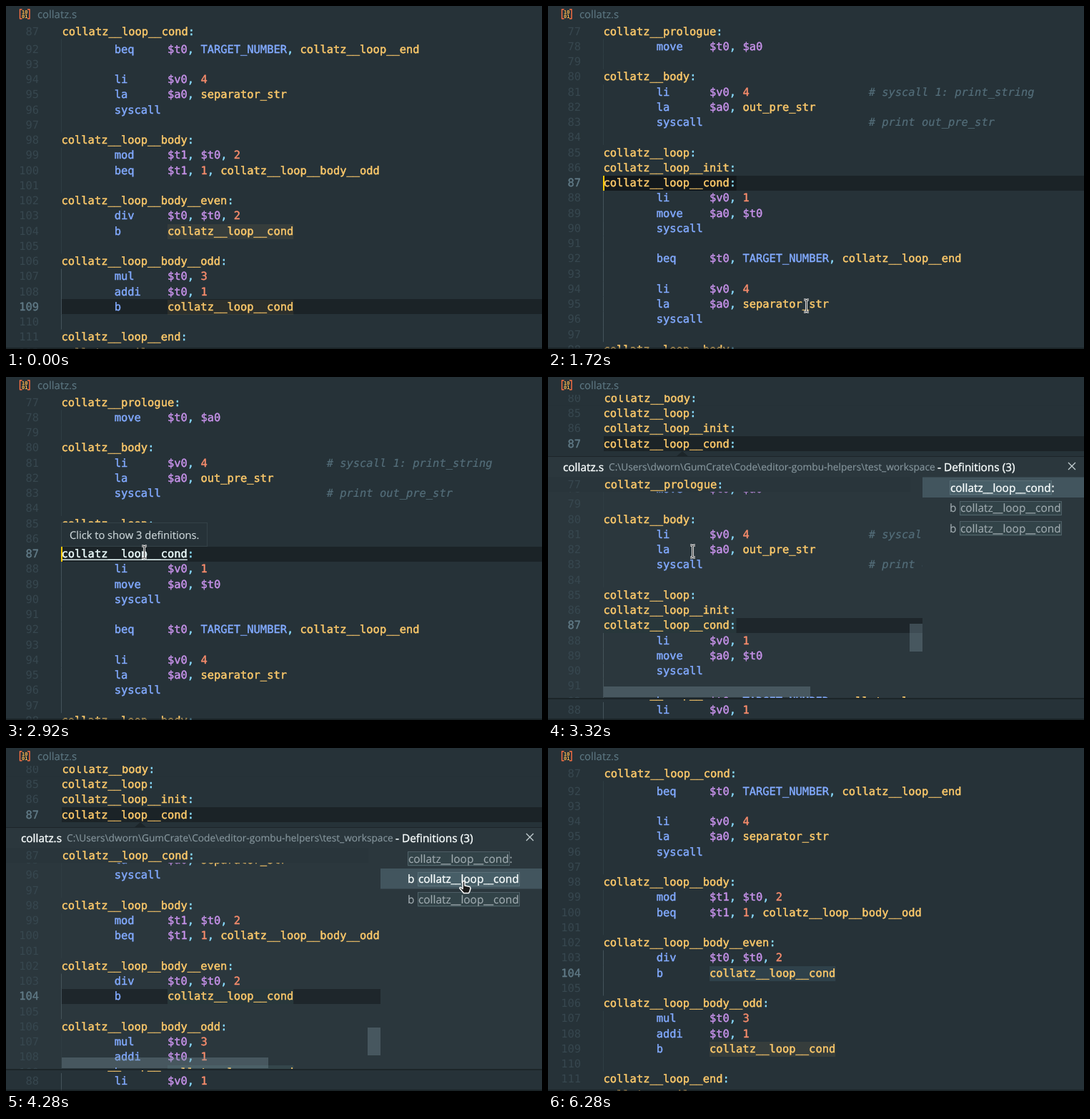
An HTML page with a canvas that plays this animation: 750 by 481 pixels, repeating every 6.36 s.

```html
<!DOCTYPE html>
<html lang="en">
<head>
<meta charset="utf-8">
<title>Peek definitions</title>
<style>
html, body { margin: 0; width: 100%; height: 100%; overflow: hidden; background: #263238; }
canvas { display: block; }
</style>
</head>
<body>
<canvas id="stage" width="750" height="481"></canvas>
<script>
const ctx = document.getElementById('stage').getContext('2d');
const LOOP = 6360, ROW = 21.25, CH = 9.28, LEFT = 77.5, FIRST = 77;
const MONO = '15.42px "DejaVu Sans Mono", monospace';
const UI = '"Open Sans", "Noto Sans", sans-serif';
const BG = '#263238', PEEK = '#2b373d', EDGE = '#1c2529', WHITE = '#f8fdfd';
const OLIVE = 'rgba(255,203,107,.075)', SELECT = '#2f414a', TEAL = 'rgba(128,203,196,.1)';

// Tabs are eight columns wide.
const lines = `collatz__prologue:
\tmove\t$t0, $a0

collatz__body:
\tli\t$v0, 4\t\t\t# syscall 1: print_string
\tla\t$a0, out_pre_str
\tsyscall\t\t\t\t# print out_pre_str

collatz__loop:
collatz__loop__init:
collatz__loop__cond:
\tli\t$v0, 1
\tmove\t$a0, $t0
\tsyscall

\tbeq\t$t0, TARGET_NUMBER, collatz__loop__end

\tli\t$v0, 4
\tla\t$a0, separator_str
\tsyscall

collatz__loop__body:
\tmod\t$t1, $t0, 2
\tbeq\t$t1, 1, collatz__loop__body__odd

collatz__loop__body__even:
\tdiv\t$t0, $t0, 2
\tb\tcollatz__loop__cond

collatz__loop__body__odd:
\tmul\t$t0, 3
\taddi\t$t0, 1
\tb\tcollatz__loop__cond

collatz__loop__end:
collatz__epilogue:`.split('\n').map(expandTabs);

function expandTabs(s) {
  let out = '';
  for (const c of s) out += c === '\t' ? ' '.repeat(8 - out.length % 8) : c;
  return out;
}

function tokenColor(word, col) {
  if (word[0] === '#') return '#546e7a';
  if (word[0] === '$') return '#c792ea';
  if (/^\d/.test(word)) return '#f78c6c';
  if (/^[,:]/.test(word)) return '#89ddff';
  return col === 8 || /^[A-Z]/.test(word) ? '#82aaff' : '#ffcb6b';
}

function rect(x, y, w, h, color) {
  ctx.fillStyle = color;
  ctx.fillRect(x, y, w, h);
}

// A thin outline gives the letters a medium weight.
function text(s, x, y, color, font, weight = 0) {
  ctx.font = font;
  ctx.fillStyle = ctx.strokeStyle = color;
  ctx.fillText(s, x, y);
  if (weight) {
    ctx.lineWidth = weight;
    ctx.strokeText(s, x, y);
  }
}

function ui(s, x, y, color, size = 15.4) {
  text(s, x, y, color, size + 'px ' + UI, color === WHITE ? .4 : .15);
}

function drawLine(n, x, cy, active, linked) {
  const y = cy + 5;
  const num = String(n);
  text(num, 46 - num.length * CH, y, active ? '#607a86' : '#37474f', MONO, active ? .4 : 0);
  for (const m of (lines[n - FIRST] || '').matchAll(/#.*|\$\w+|\w+|[,:]/g)) {
    const word = m[0], tx = x + m.index * CH;
    const link = linked && word === 'collatz__loop__cond';
    const comment = word[0] === '#';
    text(word, tx, y, link ? '#eeffff' : tokenColor(word, m.index),
         (comment ? 'italic ' : '') + MONO, comment ? .2 : .45);
    if (link) rect(tx, cy + 7.5, word.length * CH, 1.3, '#eeffff');
  }
}

// base is the centre of line 77; the rest describes selection and decorations.
function editor({ x = 0, y, w = 750, h, base, bg = BG, cur, bar = true, guide = [0, 0],
                  marks = [], sticky, stickyW = w, stickyBg = bg, link, range }) {
  const rowY = n => base + (n - FIRST) * ROW;
  ctx.save();
  ctx.beginPath();
  ctx.rect(x, y, w, h);
  ctx.clip();
  rect(x, y, w, h, bg);
  if (bar) rect(78, Math.round(rowY(cur) - 10.6), w - 78, 21, 'rgba(0,0,0,.3)');
  if (range) rect(78, Math.round(rowY(cur) - 10.6), 20 * CH, 21, range);
  for (const [n, color] of marks) {
    rect(LEFT + 16 * CH, Math.round(rowY(n) - 10), 19 * CH, 21, color);
  }
  lines.forEach((line, i) => {
    const n = FIRST + i, cy = rowY(n);
    if (cy < y - 12 || cy > y + h + 12) return;
    if (!/^\w/.test(line)) {
      rect(77, cy - ROW / 2, 1, ROW, n >= guide[0] && n <= guide[1] ? '#44535a' : '#2f3d43');
    }
    drawLine(n, LEFT, cy, n === cur, n === link);
  });
  if (sticky) {
    const [n, cy] = sticky;
    rect(x, cy - 10.6, stickyW, ROW, stickyBg);
    drawLine(n, LEFT + 1, cy, false, false);
  }
  ctx.restore();
}

function header() {
  rect(0, 0, 750, 25, BG);
  ctx.strokeStyle = '#ff7043';
  ctx.lineWidth = 1.4;
  ctx.stroke(new Path2D('M22.5 4.7h-3v13h3M30 4.7h3v13h-3'));
  const tiny = 'bold 7px "DejaVu Sans Mono", monospace';
  text('10', 22, 10.5, '#ffb74d', tiny);
  text('01', 22, 17, '#ffb74d', tiny);
  ui('collatz.s', 44, 17, '#5d7782', 14.9);
}

function listRow(i, selected, hovered) {
  const top = 140.5 + i * 28.5;
  if (selected || hovered) rect(524, top, 226, 28.5, selected ? '#42555e' : EDGE);
  const color = selected || hovered ? WHITE : '#a0abb0';
  const x = i ? 577 : 563, y = top + 20;
  if (i) ui('b', 562, y, color);
  ctx.font = '15.4px ' + UI;
  const word = 'collatz__loop__cond', w = ctx.measureText(word).width;
  rect(x - 1, top + 5.5, w + 2, 20, 'rgba(128,203,196,.08)');
  ctx.strokeStyle = '#71858c';
  ctx.lineWidth = 1;
  ctx.setLineDash([1, 1]);
  ctx.strokeRect(x - .5, Math.floor(top + 5) + .5, Math.round(w + 1), 19);
  ctx.setLineDash([]);
  ui(word, x, y, color);
  if (!i) ui(':', x + w + 1, y, color);
}

function peek(second, mx, my) {
  rect(0, 25, 750, 87, BG);
  editor({ y: 25, h: 79, base: -119, cur: 87, sticky: [80, 30] });
  editor({ y: 450, h: 31, base: 232.75, cur: 87, bar: false, guide: [88, 97] });
  ctx.fillStyle = EDGE;
  ctx.fill(new Path2D('M179 112l9-8 9 8z'));
  rect(0, 111, 750, 340, PEEK);
  rect(0, 111, 750, 1, EDGE);
  ui('collatz.s', 21, 132, WHITE);
  ui('C:\\Users\\dworn\\GumCrate\\Code\\editor-gombu-helpers\\test_workspace', 85, 131, '#87979e', 13.7);
  ui('- Definitions (3)', 545, 132, WHITE);
  ctx.strokeStyle = '#c5d0d3';
  ctx.lineWidth = 1.3;
  ctx.stroke(new Path2D('M728 120l10 10M738 120l-10 10'));

  const target = second ? 104 : 87;
  editor({
    y: 140, w: 524, h: 310, bg: PEEK, base: 348.3 - (target - FIRST) * ROW, cur: target,
    guide: second ? [103, 105] : [88, 97],
    marks: second ? [[104, TEAL], [109, TEAL]] : [],
    range: second ? null : TEAL,
    sticky: [second ? 87 : 77, 150.6], stickyW: 507, stickyBg: '#29353b'
  });
  // The scrollbars dim while the pointer is over the list.
  const thumb = `rgba(120,144,156,${second || mx < 524 ? .36 : .18})`;
  rect(78, 434, 289, 15, thumb);
  rect(506, second ? 392 : 346, 18, 39, thumb);
  const hover = mx > 524 ? Math.floor((my - 140.5) / 28.5) : -1;
  for (let i = 0; i < 3; i++) listRow(i, i === +second, i === hover);
  rect(0, 450, 750, 2, EDGE);
}

function tooltip(alpha) {
  ctx.globalAlpha = alpha;
  rect(77, 204, 205, 34, '#344248');
  rect(78, 205, 203, 32, BG);
  ui('Click to show 3 definitions.', 89, 227, '#cfd9dc', 14.7);
  ctx.globalAlpha = 1;
}

// Pointer path: time, x, y.
const path = [
  [400, 462, 453], [520, 371, 429], [680, 371, 429], [840, 363, 420], [1600, 363, 420],
  [1880, 359, 420], [2040, 359, 420], [2600, 193, 245], [3280, 193, 245], [3760, 648, 199],
  [3880, 648, 199], [4200, 640, 186], [4520, 640, 186], [5000, 610, 372],
  [5680, 610, 372], [5880, 692, 468]
];

function pointerAt(t) {
  const i = path.findIndex(p => p[0] > t);
  if (i < 1) return null;
  const [t0, x0, y0] = path[i - 1], [t1, x1, y1] = path[i];
  const u = (t - t0) / (t1 - t0), k = u * u * (3 - 2 * u);
  return [x0 + (x1 - x0) * k, y0 + (y1 - y0) * k];
}

const beam = new Path2D('M-3.5-8.5h2.5l1 1 1-1h2.5M0-7.5v15M-3.5 8.5h2.5l1-1 1 1h2.5');
const hand = new Path2D('M-1.5 1.5q0-1.5 1.5-1.5t1.5 1.5v5l6 1.2q2 .5 2 2.5l-1 4-1.5 2.8h-7l-5.5-6.5q-.5-2 1.5-1.5l2.5 2z');

function pointer([x, y], isHand) {
  const shape = isHand ? hand : beam;
  ctx.save();
  ctx.translate(Math.round(x) + .5, Math.round(y) + .5);
  ctx.strokeStyle = '#fff';
  ctx.lineWidth = isHand ? 1.5 : 2.8;
  ctx.fillStyle = ctx.shadowColor = '#1a1a1a';
  if (isHand) ctx.fill(shape);
  ctx.stroke(shape);
  if (!isHand) {
    ctx.strokeStyle = '#222';
    ctx.lineWidth = 1;
    ctx.stroke(shape);
  }
  ctx.restore();
}

const within = (t, a, b) => t >= a && t < b;
const full = { y: 25, h: 456 };
const lower = { ...full, base: -258.25, sticky: [87, 35.6] };

function draw(t) {
  ctx.textRendering = 'geometricPrecision';
  ctx.lineJoin = 'round';
  const mouse = pointerAt(t);
  const inPeek = within(t, 3240, 4360);
  if (t < 1600) {
    editor({ ...lower, cur: 109, guide: [107, 110], marks: [[104, OLIVE], [109, OLIVE]],
             link: t >= 1200 ? 109 : 0 });
  } else if (t < 3240) {
    editor({ ...full, base: 35.6, cur: 87, guide: [88, 97],
             range: t < 2200 ? 'rgba(0,0,0,.3)' : null, link: t >= 2680 ? 87 : 0 });
    if (t < 2160 || within(t, 2680, 3200)) rect(77, 238, 2, 21, '#ffcc00');
    if (t >= 2880) tooltip(t < 2920 ? .5 : 1);
  } else if (inPeek) {
    peek(t >= 4240, ...mouse);
  } else {
    editor({ ...lower, cur: 104, bar: false, guide: [103, 105],
             marks: t < 6280 ? [[104, SELECT]] : [[104, SELECT], [109, OLIVE]] });
    if (t < 4820 || within(t, 5320, 5840)) rect(402, 305, 2, 21, '#ffcc00');
  }
  rect(0, 479, 750, 2, 'rgba(20,27,31,.6)');
  header();
  if (mouse) pointer(mouse, within(t, 1200, 1600) || inPeek && mouse[0] > 524);
}

function frame() {
  draw(performance.now() % LOOP);
  requestAnimationFrame(frame);
}
frame();
</script>
</body>
</html>
```
